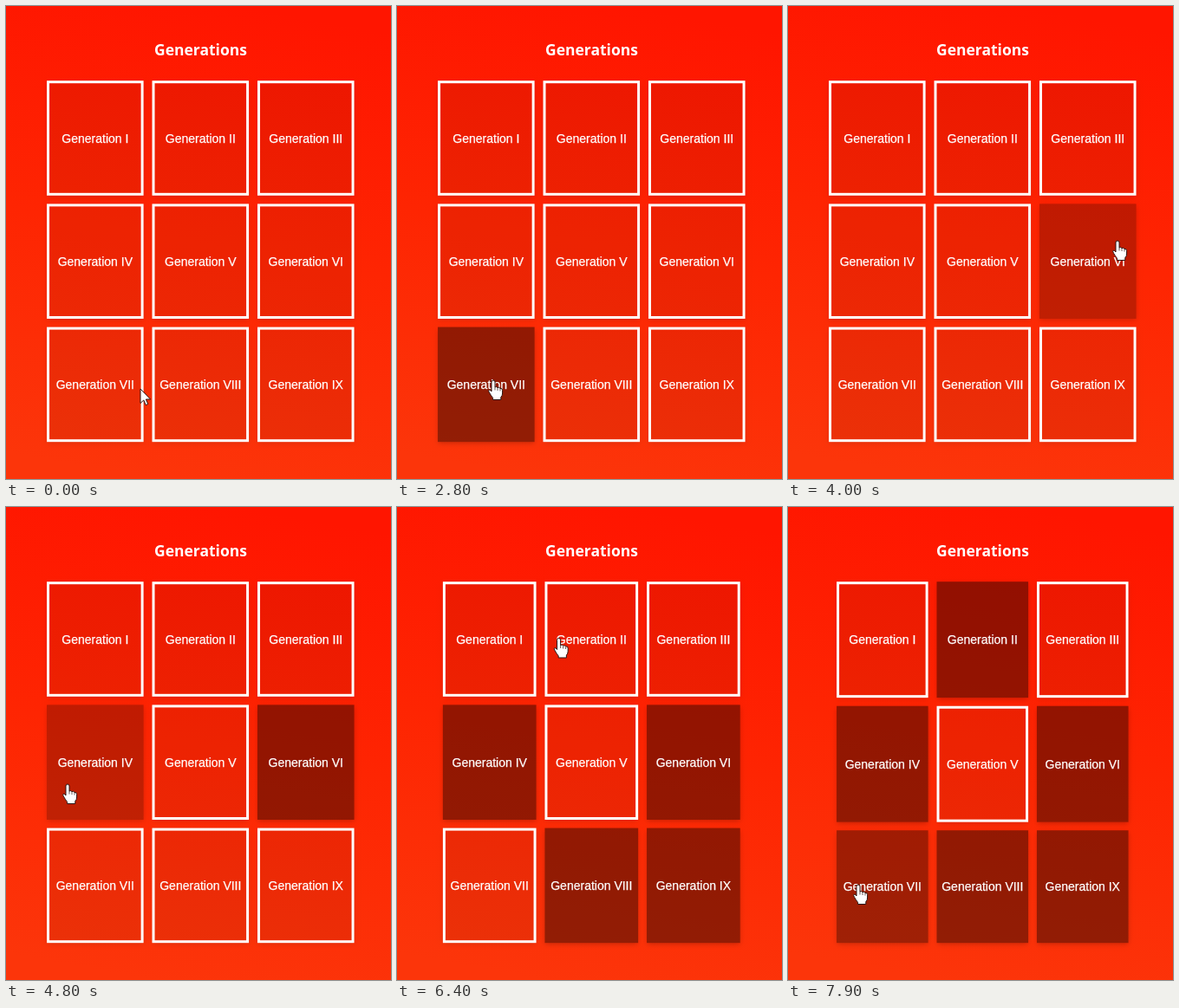
An HTML page with a canvas for the animation above (8000 ms loop, 444 px wide and 546 px high).

```html
<!DOCTYPE html>
<html lang="en">
<head>
<meta charset="utf-8">
<title>Generations</title>
<style>
  html, body { margin: 0; width: 100%; height: 100%; overflow: hidden; background: #ff2000; }
  canvas { display: block; width: 444px; height: 546px; }
</style>
</head>
<body>
<canvas id="stage" width="444" height="546"></canvas>
<script>
const ctx = document.getElementById('stage').getContext('2d');
const W = 444, H = 546, LOOP = 8000, STEP = 100, FADE = 400;
const NUMERALS = ['I', 'II', 'III', 'IV', 'V', 'VI', 'VII', 'VIII', 'IX'];
const LABEL_FONT = '14px "Liberation Sans", Arial, sans-serif';
const TITLE_FONT = 'bold 17.5px "Open Sans", "Noto Sans", sans-serif';
const GRID = { cx: 224.3, top: 86.2, gapX: 9.9, gapY: 9.6, rowH: 132.6, pad: 5.7, border: 3 };

const HOME = { at: 0, x: 155, y: 442 };
const CLICKS = [
  { at: 700, x: 335, y: 440 },
  { at: 1500, x: 113, y: 442 },
  { at: 2200, x: 335, y: 438 },
  { at: 2900, x: 111, y: 432 },
  { at: 3800, x: 380, y: 271 },
  { at: 4600, x: 71, y: 320 },
  { at: 5200, x: 225, y: 430 },
  { at: 5900, x: 340, y: 423 },
  { at: 6900, x: 188, y: 154 },
  { at: 7600, x: 81, y: 436 }
];
const STOPS = [HOME, ...CLICKS];
const REST = 200, AIM = 100;   // pause after and before a click

const ARROW = new Path2D('M0 0 V16.5 L3.8 13 L6.2 18.6 L8.8 17.5 L6.4 12 H11.6 Z');
const HAND = new Path2D(
  'M-2 2 Q-2 0 0 0 Q2 0 2 2 V8 Q3.6 6.8 5 8.6 Q6.6 7.6 8 9.4 ' +
  'Q10.6 9 10.6 11.6 V15 Q10.6 18 8.8 19.6 V22.5 H-.4 V20.4 ' +
  'Q-2.4 18 -4.4 14.4 Q-6 11.8 -4.8 11.2 Q-3.6 10.8 -2 13 Z');
const KNUCKLES = new Path2D('M2 8 V11.5 M5 9 V12 M8 10 V12.5');

const clamp = v => Math.min(1, Math.max(0, v));
const smooth = v => v * v * (3 - 2 * v);
// Ease out with a small overshoot
const swing = v => 1 + 2.4 * (v - 1) ** 3 + 1.4 * (v - 1) ** 2;
const labels = NUMERALS.map(n => 'Generation ' + n);

const tileUnder = p => Math.floor((p.x - 46) / 121.5) + 3 * Math.floor((p.y - 81) / 142);

function tileStates(t) {
  const tiles = labels.map(() => ({ on: false, since: -FADE }));
  for (const click of CLICKS) {
    if (t < click.at) break;
    const s = tiles[tileUnder(click)];
    s.on = !s.on;
    s.since = click.at;
  }
  for (const s of tiles) {
    const p = smooth(clamp((t - s.since) / FADE));
    s.dark = s.on ? p : 1 - p;
  }
  return tiles;
}

// Columns follow the widest tile; a row without borders gives up some height.
function layout(tiles) {
  ctx.font = LABEL_FONT;
  const w = Math.max(...labels.map((text, i) =>
    ctx.measureText(text).width + 2 * GRID.pad + (tiles[i].on ? 0 : 2 * GRID.border)));
  const loss = [0, 1, 2].map(r => tiles.slice(r * 3, r * 3 + 3).every(s => s.on) ? 4 : 0);
  const share = (loss[0] + loss[1] + loss[2]) / 3;
  const boxes = [];
  let y = GRID.top;
  for (let r = 0; r < 3; r++) {
    const h = GRID.rowH + share - loss[r];
    for (let c = 0; c < 3; c++) {
      const mid = GRID.cx + (c - 1) * (w + GRID.gapX);
      boxes.push({ x: mid - w / 2, y, w, h, mid, base: Math.round(y + h / 2 + 5) });
    }
    y += h + GRID.gapY;
  }
  return boxes;
}

function pointerAt(t) {
  const next = STOPS.findIndex(s => s.at > t);
  if (next < 0) return STOPS[STOPS.length - 1];
  const a = STOPS[next - 1], b = STOPS[next];
  const from = a.at + REST, to = b.at - AIM;
  const p = swing(clamp((t - from) / (to - from)));
  return { x: a.x + (b.x - a.x) * p, y: a.y + (b.y - a.y) * p };
}

function drawBackground() {
  const g = ctx.createLinearGradient(270, 0, 170, H);
  g.addColorStop(0, '#ff1500');
  g.addColorStop(0.5, '#fe2502');
  g.addColorStop(1, '#fc350a');
  ctx.fillStyle = g;
  ctx.fillRect(0, 0, W, H);
}

function drawShadow(b, dark) {
  ctx.save();
  ctx.beginPath();
  ctx.rect(0, 0, W, H);
  ctx.rect(b.x, b.y, b.w, b.h);
  ctx.clip('evenodd');
  ctx.shadowColor = `rgba(0,0,0,${0.14 + 0.1 * dark})`;
  ctx.shadowBlur = 6;
  ctx.shadowOffsetY = 2;
  ctx.fillStyle = '#000';
  ctx.fillRect(b.x + 1, b.y + 1, b.w - 2, b.h - 2);
  ctx.restore();
}

function drawTile(b, s, text) {
  drawShadow(b, s.dark);
  ctx.fillStyle = `rgba(0,0,0,${0.065 + 0.36 * s.dark})`;
  ctx.fillRect(b.x, b.y, b.w, b.h);
  ctx.strokeStyle = ctx.fillStyle = '#fff';
  if (!s.on) {
    const k = GRID.border;
    ctx.lineWidth = k;
    ctx.strokeRect(b.x + k / 2, b.y + k / 2, b.w - k, b.h - k);
  }
  ctx.font = LABEL_FONT;
  ctx.lineWidth = 0.25;
  ctx.fillText(text, b.mid, b.base);
  ctx.strokeText(text, b.mid, b.base);
}

function drawPointer(p, boxes) {
  const inset = 5;
  const over = boxes.some(b => p.x > b.x + inset && p.x < b.x + b.w - inset &&
    p.y > b.y + inset && p.y < b.y + b.h - inset);
  const shape = over ? HAND : ARROW;
  ctx.save();
  ctx.translate(p.x, p.y);
  ctx.lineWidth = 1;
  ctx.lineJoin = 'round';
  ctx.strokeStyle = '#2a1512';
  ctx.fillStyle = '#fff';
  ctx.fill(shape);
  ctx.stroke(shape);
  if (over) {
    ctx.lineWidth = 0.7;
    ctx.stroke(KNUCKLES);
  }
  ctx.restore();
}

function draw(t) {
  const tiles = tileStates(t), boxes = layout(tiles);
  drawBackground();
  ctx.textAlign = 'center';
  ctx.font = TITLE_FONT;
  ctx.fillStyle = '#fff';
  ctx.fillText('Generations', 224.5, 57);
  boxes.forEach((b, i) => drawTile(b, tiles[i], labels[i]));
  drawPointer(pointerAt(t), boxes);
}

const start = performance.now();
function frame() {
  const t = (performance.now() - start) % LOOP;
  draw(Math.floor(t / STEP) * STEP);
  requestAnimationFrame(frame);
}
frame();
</script>
</body>
</html>
```
